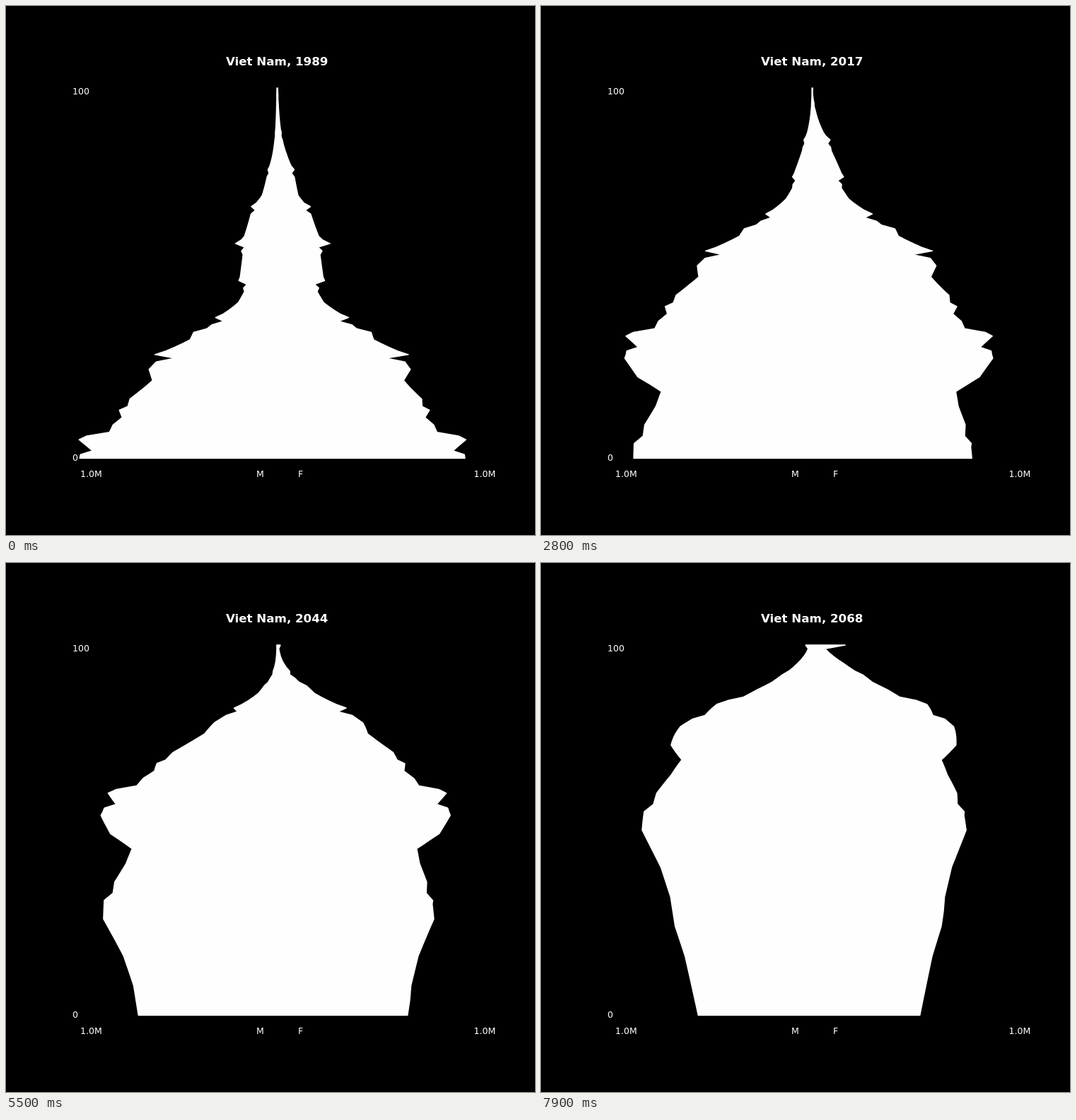
Write an HTML page with a canvas that moves like this. It is 748 by 748 pixels and loops after 8000 ms.

```html
<!DOCTYPE html>
<html lang="en">
<head>
<meta charset="utf-8">
<title>Population pyramid</title>
<style>
  html, body { margin: 0; width: 100%; height: 100%; overflow: hidden; background: #000; }
  canvas { display: block; }
</style>
</head>
<body>
<canvas id="stage" width="748" height="748"></canvas>
<script>
const ctx = document.getElementById('stage').getContext('2d');
const START = 1989, YEARS = 80, STEP_MS = 100, OLDEST = 1889;
const CENTER = 383.3, BASE = 639.4, ROW = 5.233, LINE = 1.5;

// Key points [birth year, men in 1989 or at birth], as half-widths in pixels.
const cohorts = [
  [1889, .3], [1911, 12], [1918, 21], [1921, 34], [1929, 46], [1931, 55], [1934, 48],
  [1940, 52], [1944, 46], [1947, 55], [1950, 76], [1954, 99], [1955, 118], [1957, 123],
  [1960, 157], [1965, 181], [1968, 176], [1973, 208], [1975, 211], [1976, 223], [1978, 219],
  [1980, 232], [1982, 237], [1983, 269], [1984, 280], [1987, 261], [1988, 278], [1990, 280],
  [1995, 257], [1999, 220], [2003, 226], [2008, 240], [2011, 241], [2013, 253], [2018, 252],
  [2028, 220], [2036, 204], [2044, 196], [2052, 181], [2068, 161]
];
// Women per man by birth year.
const sexRatio = [
  [1889, 3], [1907, 2.2], [1920, 1.3], [1943, 1.24], [1970, 1],
  [1978, .955], [1998, .95], [2014, .89], [2040, .94], [2068, .947]
];

// Mortality: a background risk that fades over the years, and an old-age risk
// that grows with age; level, slope and bend give its log by age in 1989.
const male = { side: -1, risk: .11, level: -4.87, slope: .105, bend: .00022, growth: .088 };
const female = { side: 1, risk: .085, level: -5.6, slope: .1075, bend: .0001, growth: .092 };

// Geometric interpolation between key points.
function curve(points, x) {
  const i = Math.max(1, points.findIndex(p => p[0] >= x));
  const [x0, y0] = points[i - 1], [x1, y1] = points[i];
  return y0 * (y1 / y0) ** ((x - x0) / (x1 - x0));
}

// Older people round their birth year: years ending in 1 gain, those in 2 lose.
function heaping(birth) {
  if (birth > 1962) return 1;
  return { 1: 1.07, 2: .87 }[birth % 10] ?? 1;
}

function survivors(sex, birth, year) {
  const from = Math.max(0, birth - START), to = year - START;
  const x = START - 28 - birth;
  const old = Math.exp(sex.level + sex.slope * x - sex.bend * x * x);
  const hazard = sex.risk * (Math.exp(-from / 40) - Math.exp(-to / 40))
    + old * (Math.exp(sex.growth * to) - Math.exp(sex.growth * from));
  const ratio = sex === female ? curve(sexRatio, birth) : 1;
  return curve(cohorts, birth) * heaping(birth) * ratio * Math.exp(-hazard);
}

// The last row gathers everyone aged 100 and over.
function halfWidth(sex, age, year) {
  let sum = 0;
  const first = age === 100 ? OLDEST : year - age;
  for (let birth = first; birth <= year - age; birth++) sum += survivors(sex, birth, year);
  return Math.max(sum, .2);
}

function addPoint(sex, age, year) {
  ctx.lineTo(CENTER + sex.side * halfWidth(sex, age, year), BASE - age * ROW);
}

function draw(year) {
  ctx.fillStyle = '#000';
  ctx.fillRect(0, 0, 748, 748);

  ctx.fillStyle = ctx.strokeStyle = '#fefefe';
  ctx.lineWidth = LINE;
  ctx.beginPath();
  for (let age = 0; age <= 100; age++) addPoint(male, age, year);
  for (let age = 100; age >= 0; age--) addPoint(female, age, year);
  ctx.closePath();
  ctx.lineJoin = 'round';
  ctx.fill();
  ctx.stroke();

  ctx.fillStyle = '#fff';
  ctx.font = 'bold 16.67px "DejaVu Sans", sans-serif';
  ctx.fillText(`Viet Nam, ${year}`, 311, 84);
  ctx.font = '12.5px "DejaVu Sans", sans-serif';
  ctx.fillText('100', 94, 125);
  ctx.fillText('0', 94, 643);
  ctx.fillText('1.0M', 105, 666);
  ctx.fillText('M', 354, 666);
  ctx.fillText('F', 413, 666);
  ctx.fillText('1.0M', 661.5, 666);
}

function tick() {
  draw(START + Math.floor(performance.now() / STEP_MS) % YEARS);
  requestAnimationFrame(tick);
}
tick();
</script>
</body>
</html>
```
